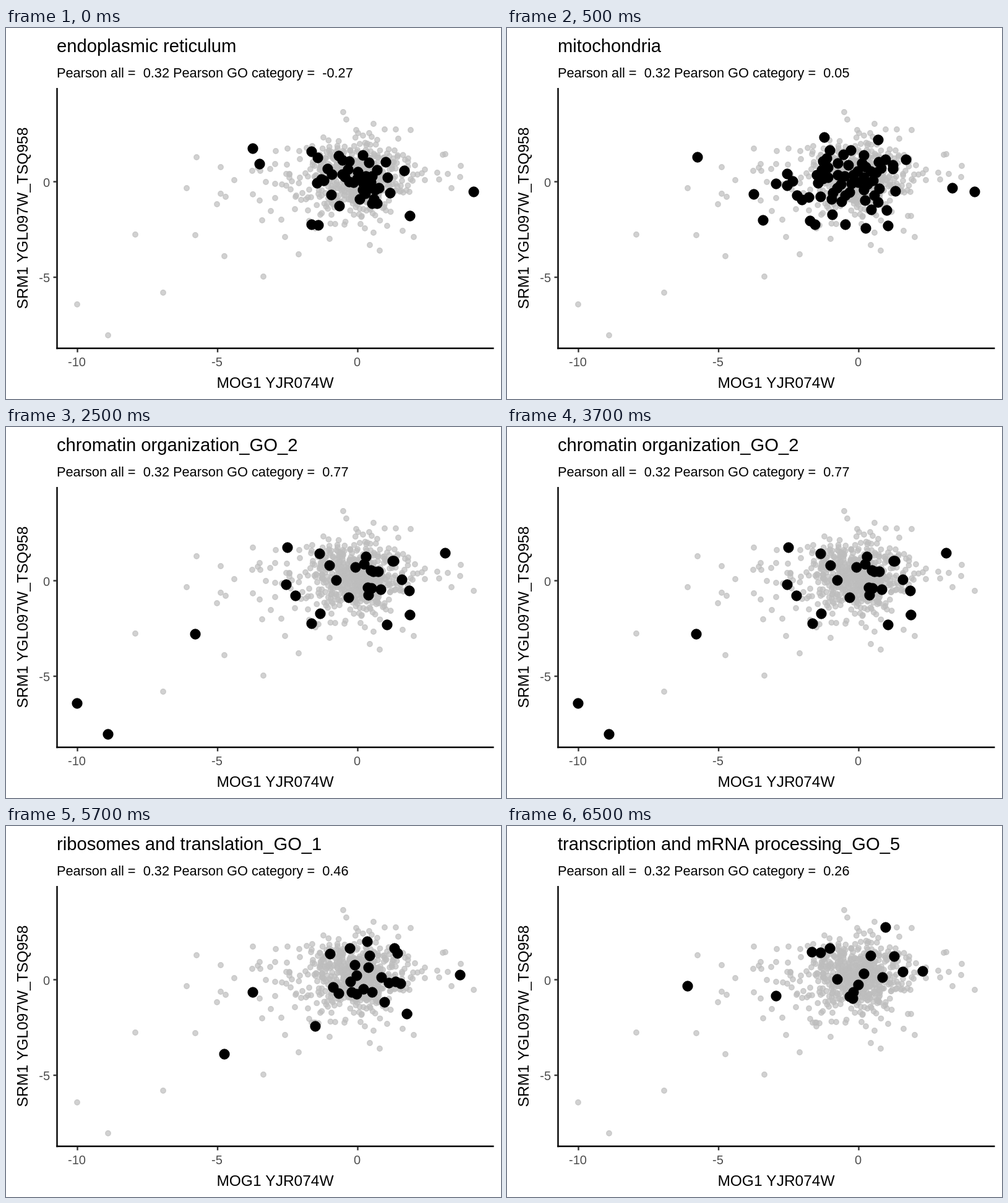
Recreate the animation shown at these times as an HTML page with a canvas. Size 800x600 px, loop 8 s.

```html
<!DOCTYPE html>
<html lang="en">
<head>
<meta charset="utf-8">
<title>Scatter by category</title>
<style>
html, body { margin: 0; width: 100%; height: 100%; overflow: hidden; background: #fff; }
canvas { display: block; }
</style>
</head>
<body>
<canvas id="plot" width="800" height="600"></canvas>
<script>
const ctx = document.getElementById('plot').getContext('2d');
const LOOP = 8000;
const FONT = '"Liberation Sans", Arial, sans-serif';

// Highlighted points per category, in stage pixels: x, y, x, y, ...
const scenes = [
  { start: 0, title: 'endoplasmic reticulum', r: '-0.27', pts: [
    399,195, 410,220, 494,200, 504,210, 538,207, 544,214, 555,216, 577,206,
    587,218, 614,217, 644,231, 756,265, 653,304, 621,267, 617,242, 600,230,
    520,228, 527,237, 503,251, 514,247, 510,245, 526,270, 539,288, 494,318,
    505,319, 572,277, 592,284, 600,284, 595,277, 603,259, 592,240, 582,240,
    577,262, 569,233, 553,229, 544,237, 548,241, 555,249, 562,250, 568,244,
    578,252, 590,250, 585,260, 581,268, 597,262] },
  { start: 500, title: 'mitochondria', r: '0.05', pts: [
    308,209, 399,269, 414,311, 513,177, 522,198, 517,211, 511,216, 556,198,
    544,205, 577,206, 600,181, 645,213, 624,222, 624,228, 612,213, 601,217,
    605,227, 720,259, 756,265, 435,252, 453,236, 453,255, 462,248, 469,271,
    477,278, 488,274, 490,312, 498,318, 507,273, 526,302, 525,277, 527,267,
    541,281, 547,271, 554,266, 547,318, 580,324, 616,320, 614,295, 589,294,
    600,282, 594,271, 602,260, 628,264, 579,279, 577,262, 503,251, 501,238,
    511,244, 519,242, 519,226, 509,230, 535,219, 535,238, 534,259, 552,222,
    546,240, 540,253, 557,252, 568,250, 560,238, 567,232, 574,219, 580,225,
    588,232, 597,234, 592,247, 583,253, 577,242] },
  { start: 2500, title: 'chromatin organization_GO_2', r: '0.77', pts: [
    115,447, 165,497, 306,335, 455,195, 453,255, 468,273, 507,205, 523,224,
    534,248, 565,227, 582,210, 579,222, 590,232, 594,234, 602,234, 625,217,
    627,217, 640,247, 652,265, 653,304, 616,320, 585,260, 591,261, 606,263,
    586,272, 554,276, 508,302, 494,318, 710,204] },
  { start: 4500, title: 'ribosomes and translation_GO_1', r: '0.46', pts: [
    353,369, 399,269, 500,324, 524,207, 556,198, 584,187, 628,198, 633,206,
    588,210, 564,225, 586,229, 567,242, 557,252, 529,261, 538,271, 559,269,
    567,272, 578,264, 592,269, 607,245, 619,254, 630,252, 638,255, 612,285,
    648,304, 734,241] },
  { start: 6500, title: 'transcription and mRNA processing_GO_5', r: '0.26', pts: [
    292,259, 435,275, 493,204, 507,205, 522,198, 534,248, 577,239, 568,257,
    560,269, 554,276, 559,279, 588,210, 607,245, 626,211, 640,236, 672,235,
    612,164] }
];

const sparse = [
  545,136, 550,148, 594,155, 566,165, 569,170, 587,170, 577,174, 591,176,
  630,164, 654,165, 634,179, 486,194, 436,199, 474,199, 347,225, 347,268,
  355,273, 341,285, 369,246, 398,231, 407,226, 411,231, 410,279, 428,296,
  445,310, 451,338, 473,366, 416,402, 254,428, 209,334, 523,341, 588,351,
  604,360, 659,338, 641,328, 594,331, 677,229, 677,246, 665,237, 697,234,
  700,245, 706,205, 714,236, 735,223, 435,220, 427,228, 420,249, 454,221,
  446,253, 458,242, 460,261, 467,293, 475,212, 488,295, 661,222, 650,211,
  658,237, 532,317, 573,317, 458,236, 484,235, 479,267, 475,242, 500,318];

const pairs = list => list.flatMap((v, i) => i % 2 ? [] : [[v, list[i + 1]]]);

function random(seed) {
  return () => (seed = seed * 16807 % 2147483647) / 2147483647;
}

// Dense cloud around the origin of the plot
function cloud(count) {
  const rnd = random(4817), out = [];
  while (out.length < count) {
    const m = Math.sqrt(-2 * Math.log(rnd())), a = rnd() * Math.PI * 2;
    const x = 565 + 37 * m * Math.cos(a), y = 241 + 29 * m * Math.sin(a);
    if (((x - 560) / 104) ** 2 + ((y - 248) / 74) ** 2 < 1) out.push([x, y]);
  }
  return out;
}

const listed = pairs([...sparse, ...scenes.flatMap(s => s.pts)]);
const unique = [...new Map(listed.map(p => [p.join(), p])).values()];
const points = [...unique, ...cloud(430)];

function dot([x, y], r, color) {
  ctx.beginPath();
  ctx.arc(x, y, r, 0, Math.PI * 2);
  ctx.fillStyle = ctx.strokeStyle = color;
  ctx.lineWidth = 1.5;
  ctx.fill();
  ctx.stroke();
}

function line(x1, y1, x2, y2, color) {
  ctx.beginPath();
  ctx.moveTo(x1, y1);
  ctx.lineTo(x2, y2);
  ctx.strokeStyle = color;
  ctx.lineWidth = 2.4;
  ctx.stroke();
}

function text(str, x, y, size, align = 'left', color = '#000') {
  ctx.font = `${size}px ${FONT}`;
  ctx.textAlign = align;
  ctx.fillStyle = color;
  ctx.fillText(str, x, y);
}

function axes() {
  line(82.5, 97, 82.5, 519.2, '#000');
  line(81.3, 518, 788.5, 518, '#000');
  [-10, -5, 0].forEach(v => {
    const x = 568.5 + v * 45.3;
    line(x, 519, x, 524.5, '#333');
    text(v, x - 1, 547, 20, 'center', '#4d4d4d');
  });
  [-5, 0].forEach(v => {
    const y = 248.6 - v * 30.9;
    line(76.5, y, 81.5, y, '#333');
    text(v, 71, y + 8, 20, 'right', '#4d4d4d');
  });
  text('MOG1 YJR074W', 435, 582, 24.5, 'center');
  ctx.save();
  ctx.translate(35, 307.5);
  ctx.rotate(-Math.PI / 2);
  text('SRM1 YGL097W_TSQ958', 0, 0, 24.6, 'center');
  ctx.restore();
}

function draw(scene) {
  ctx.fillStyle = '#fff';
  ctx.fillRect(0, 0, 800, 600);
  axes();
  points.forEach(p => dot(p, 4.2, 'rgba(190,190,190,0.7)'));
  pairs(scene.pts).forEach(p => dot(p, 7.9, '#000'));
  text(scene.title, 82, 39, 29.2);
  text(`Pearson all =  0.32 Pearson GO category =  ${scene.r}`, 82, 80, 21.75);
}

let shown = null;
function tick() {
  const t = performance.now() % LOOP;
  const scene = scenes.findLast(s => t >= s.start);
  if (scene !== shown) draw(shown = scene);
  requestAnimationFrame(tick);
}
tick();
</script>
</body>
</html>
```
